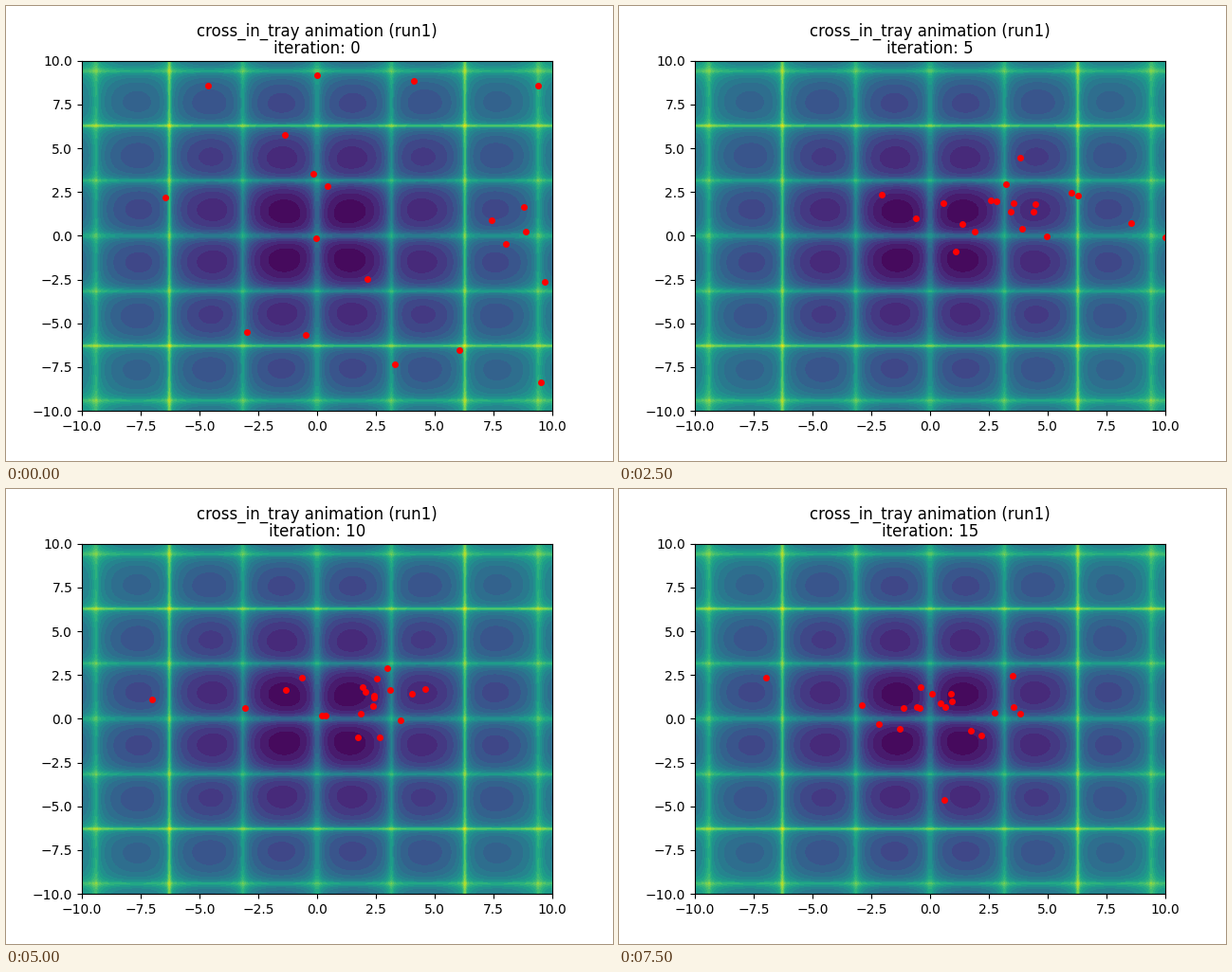
Animation of 640x480 px, one loop 8 s. Source, as a matplotlib script:

```python
import numpy as np
import matplotlib.pyplot as plt
from matplotlib.animation import FuncAnimation

FRAMES, INTERVAL = 16, 500
LIMIT, PARTICLES = 10, 20


def cross_in_tray(x, y):
    bowl = np.exp(np.abs(100 - np.hypot(x, y) / np.pi))
    return -0.0001 * (np.abs(np.sin(x) * np.sin(y) * bowl) + 1) ** 0.1


rng = np.random.default_rng(4)
shape = (PARTICLES, 2)
start = rng.uniform(-LIMIT, LIMIT, shape)
reach = rng.exponential((2.6, 2.2), shape)
speed = rng.uniform(0.7, 1.4, shape)
phase = rng.uniform(0, 2 * np.pi, shape)

# The swarm swings around the best point every six iterations
best = np.array([1.2, 1.1])
swing = np.array([1.7, 0.8])


def positions(i):
    centre = best + swing * np.cos(2 * np.pi * (i - 5) / 6)
    orbit = centre + reach * np.cos(speed * i + phase)
    fade = 0.35 ** i
    return np.clip(fade * start + (1 - fade) * orbit, -LIMIT, LIMIT)


fig, ax = plt.subplots(figsize=(6.4, 4.8), dpi=100)
grid = np.linspace(-LIMIT, LIMIT, 200)
X, Y = np.meshgrid(grid, grid)
ax.contourf(X, Y, cross_in_tray(X, Y), levels=20, cmap="viridis")
ax.set(xlim=(-LIMIT, LIMIT), ylim=(-LIMIT, LIMIT))
dots, = ax.plot([], [], "ro", markersize=4)
title = ax.set_title("", pad=5.3, linespacing=1.05)


def update(i):
    dots.set_data(*positions(i).T)
    title.set_text(f"cross_in_tray animation (run1)\niteration: {i}")
    return dots, title


anim = FuncAnimation(fig, update, frames=FRAMES, interval=INTERVAL,
                     repeat=True, repeat_delay=0)
plt.show()
```
